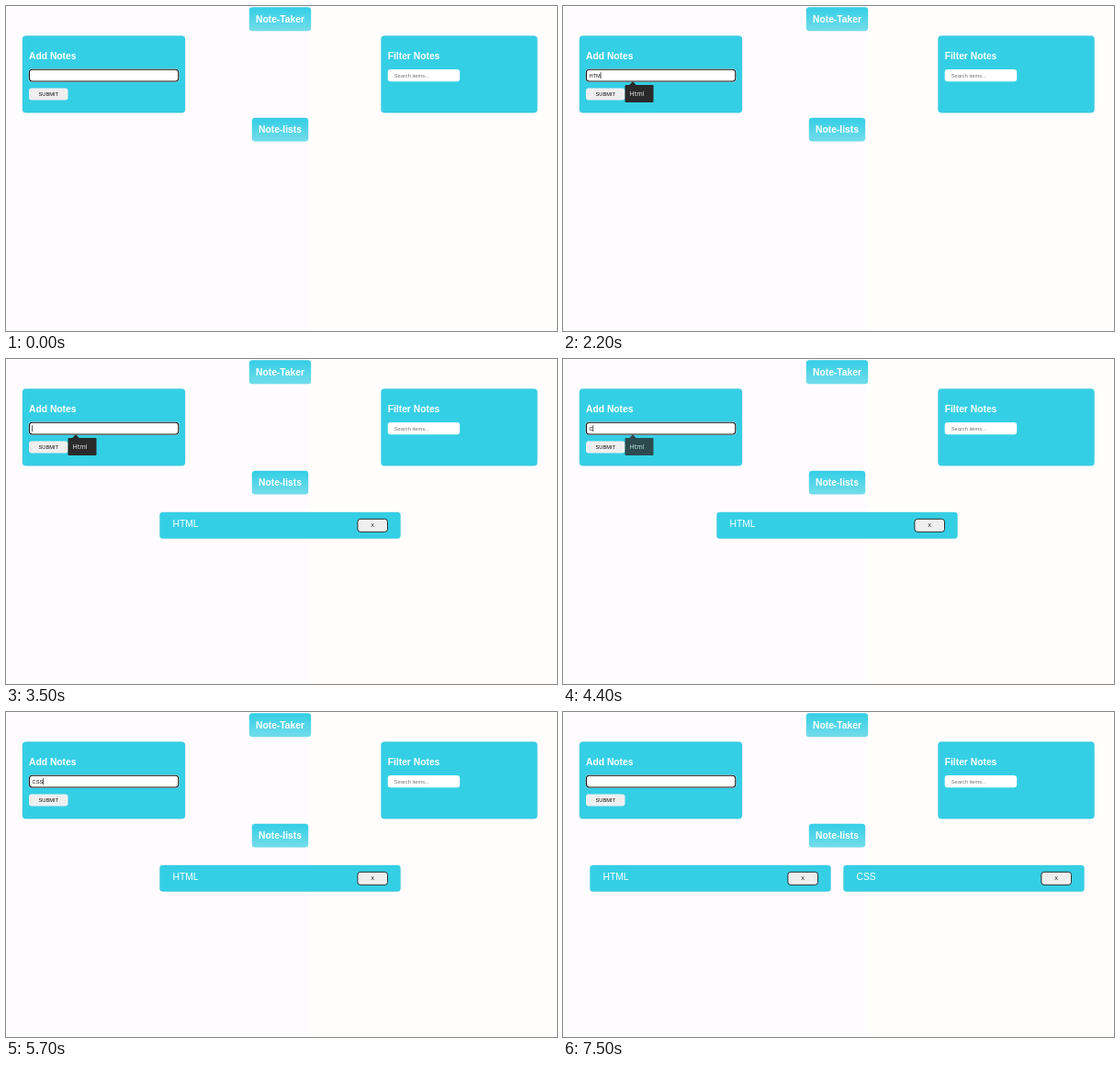
Write an HTML page that moves like this. It is 600 px wide and 354 px high and loops after 8000 ms.

```html
<!DOCTYPE html>
<html lang="en">
<head>
<meta charset="utf-8">
<title>Note-Taker</title>
<style>
  html, body { margin: 0; width: 100%; height: 100%; overflow: hidden; }
  body { background: linear-gradient(90deg, #fefcff 55%, #fffefc 55%); }
  svg { display: block; width: 600px; height: 354px; }
  text { font: 5.73px "Liberation Sans", Arial, sans-serif; fill: #111; white-space: pre; }
  .heading { font-size: 10.3px; font-weight: bold; fill: #fff; }
  .item { font-size: 10.3px; fill: #fff; }
  .mid { text-anchor: middle; }
  .panel { fill: #35cfe5; stroke: #2fb9ce; stroke-width: .3; }
  .button { fill: #efefef; }
  .outlined { stroke: #1c1c1c; stroke-width: .9; }
  #popup text { font: 7px "Open Sans", "Noto Sans", sans-serif; fill: #f4f4f4; }
</style>
</head>
<body>
<svg viewBox="0 0 600 354">
  <defs>
    <linearGradient id="fade" x2="0" y2="1">
      <stop stop-color="#33cee5"/>
      <stop offset="1" stop-color="#73dcea"/>
    </linearGradient>
    <g id="note">
      <rect class="panel" y="166.9" width="262" height="28.5" rx="3.2"/>
      <rect class="button outlined" x="215.4" y="174.3" width="32.6" height="14" rx="3"/>
      <text class="mid" x="231.7" y="183.2">X</text>
    </g>
  </defs>

  <rect x="264.8" y="1.2" width="67.4" height="26" rx="3.5" fill="url(#fade)"/>
  <text class="heading mid" x="298.5" y="17.8">Note-Taker</text>
  <rect x="267.8" y="121.7" width="61.4" height="25.8" rx="3.5" fill="url(#fade)"/>
  <text class="heading mid" x="298.5" y="138.2">Note-lists</text>

  <rect class="panel" x="18" y="32.6" width="177" height="83.6" rx="3.5"/>
  <text class="heading" x="25" y="57.6">Add Notes</text>
  <rect x="24.6" y="68.4" width="164" height="14.4" rx="4" fill="#fff"/>
  <rect x="25.4" y="69.2" width="162.4" height="12.8" rx="3.4" fill="#fff" stroke="#101010" stroke-width="1.1"/>
  <text id="entry" x="28.5" y="77.6"></text>
  <rect id="caret" y="72.2" width=".7" height="6.8" fill="#111"/>
  <rect class="button" x="25" y="89.5" width="42.5" height="13" rx="3"/>
  <text class="mid" x="46.3" y="98.1">SUBMIT</text>

  <rect class="panel" x="408.5" y="32.6" width="170" height="83.6" rx="3.5"/>
  <text class="heading" x="415.7" y="57.6">Filter Notes</text>
  <rect x="415.7" y="69" width="78.5" height="13.2" rx="3.2" fill="#fff"/>
  <text x="422.7" y="77.6" style="fill:#757575">Search items...</text>

  <g id="html">
    <use href="#note"/>
    <text class="item" x="14" y="183.2">HTML</text>
  </g>
  <g id="css" transform="translate(305.5)">
    <use href="#note"/>
    <text class="item" x="14" y="183.2">CSS</text>
  </g>

  <g id="popup">
    <path d="M71.8 86.5L76 82.2L80.2 86.5Z" fill="#2a2a2a"/>
    <rect x="67.5" y="86" width="31" height="19" rx="1" fill="#2a2a2a"/>
    <text x="72.6" y="98.2">Html</text>
  </g>
</svg>
<script>
const LOOP = 8000;
const typed = [[0, ""], [1300, "H"], [1900, "HT"], [2100, "HTM"], [2300, "HTML"], [3500, ""],
  [4400, "C"], [4600, "CS"], [4800, "CSS"], [6200, ""]];
const caretOn = [[500, 1000], [1300, 2700], [3300, 3900], [4400, 5300], [5700, 6300], [6900, 7500]];
const submitHtml = 3500, submitCss = 6200;
const popupOpen = 1300, popupClose = 4400;

const el = id => document.getElementById(id);
const entry = el("entry"), caret = el("caret"), popup = el("popup"), html = el("html"), css = el("css");
const show = (node, visible) => node.setAttribute("visibility", visible ? "visible" : "hidden");

function popupOpacity(t) {
  if (t < popupOpen) return 0;
  if (t < popupClose) return 1;
  return Math.max(0, 0.8 - (t - popupClose) / 300);
}

function render(t) {
  const text = typed.findLast(([start]) => t >= start)[1];
  if (entry.textContent !== text) entry.textContent = text;
  caret.setAttribute("x", 28.3 + (text ? entry.getComputedTextLength() : 0));
  show(caret, caretOn.some(([start, end]) => t >= start && t < end));
  popup.setAttribute("opacity", popupOpacity(t));
  show(html, t >= submitHtml);
  show(css, t >= submitCss);
  html.setAttribute("transform", `translate(${t < submitCss ? 167.5 : 29.5})`);
}

const begin = performance.now();
function tick() {
  render((performance.now() - begin) % LOOP);
  requestAnimationFrame(tick);
}
tick();
</script>
</body>
</html>
```
